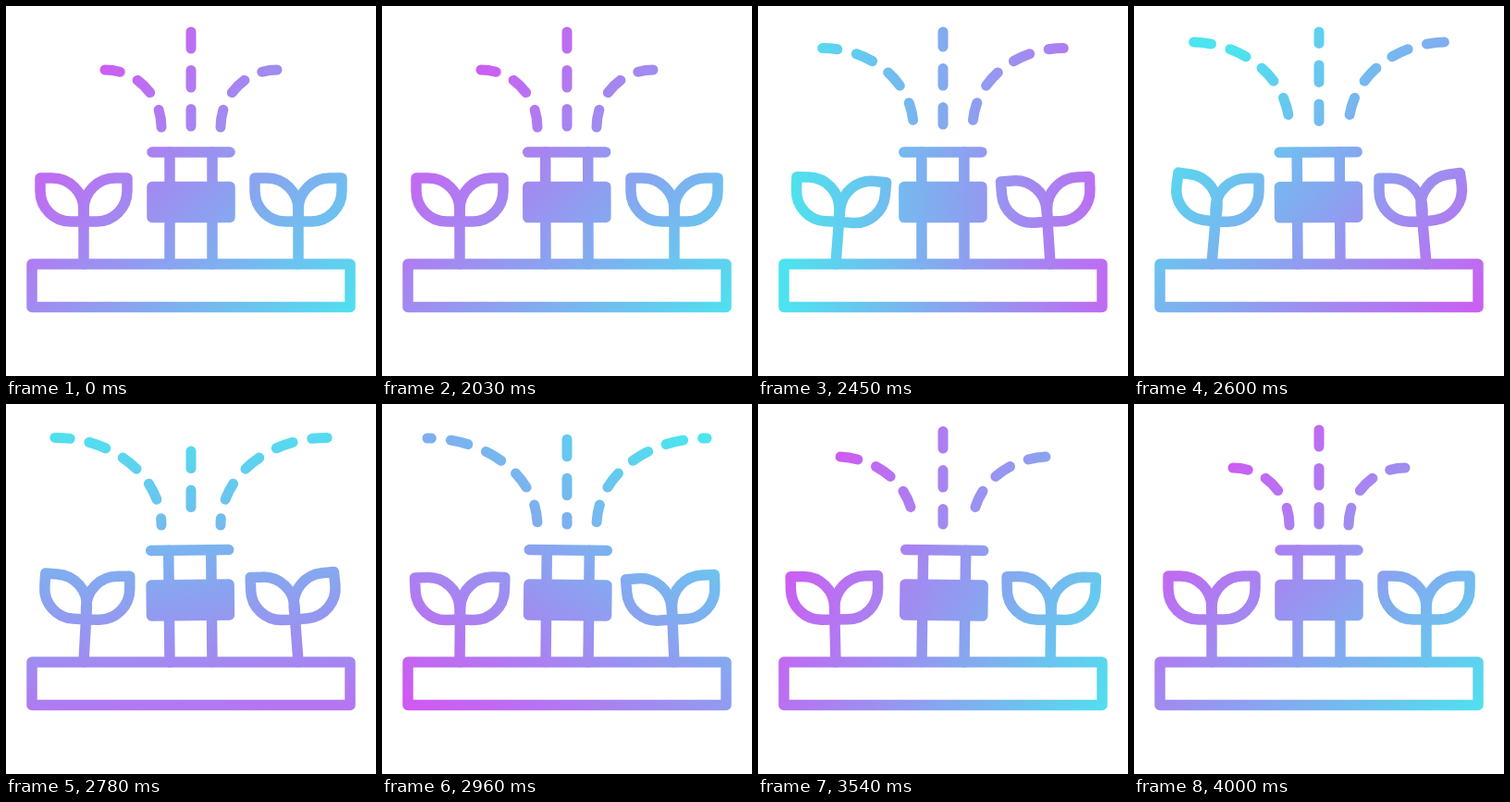
An HTML page with a canvas that plays this animation: 400 px wide and 400 px high, repeating every 4.06 s.

```html
<!DOCTYPE html>
<html lang="en">
<head>
<meta charset="utf-8">
<title>Garden sprinkler</title>
<style>
html, body { margin: 0; width: 100%; height: 100%; overflow: hidden; background: #fff; }
canvas { display: block; width: 400px; height: 400px; }
</style>
</head>
<body>
<canvas id="stage"></canvas>
<script>
const LOOP = 4060, START = 2030, MOVE = 1970, TAU = Math.PI * 2;
const canvas = document.getElementById('stage');
const ctx = canvas.getContext('2d');
const ratio = Math.max(1, window.devicePixelRatio || 1);
canvas.width = canvas.height = 400 * ratio;

const TIMES = [0, 240, 570, 930, 1180, MOVE];
const rad = deg => deg * Math.PI / 180;

// Smooth curve through one value per entry of TIMES, resting at both ends
function curve(t, values) {
  const last = TIMES.length - 1;
  let i = 0;
  while (i < last - 1 && t >= TIMES[i + 1]) i++;
  const slope = k => k === 0 || k === last ? 0
    : (values[k + 1] - values[k - 1]) / (TIMES[k + 1] - TIMES[k - 1]);
  const span = TIMES[i + 1] - TIMES[i];
  const u = (t - TIMES[i]) / span, v = 1 - u;
  return values[i] * (1 + 2 * u) * v * v + slope(i) * span * u * v * v
    + values[i + 1] * u * u * (3 - 2 * u) - slope(i + 1) * span * u * u * v;
}

function group(draw) {
  ctx.save();
  draw();
  ctx.restore();
}

function line(x1, y1, x2, y2) {
  ctx.beginPath();
  ctx.moveTo(x1, y1);
  ctx.lineTo(x2, y2);
  ctx.stroke();
}

function mirror() {
  ctx.translate(400, 0);
  ctx.scale(-1, 1);
}

// Leaf pointing up and left from its root at the origin
const leafShape = new Path2D('M0 0H-14A33 33 0 0 1 -47 -33V-47H-34A34 34 0 0 1 0 -13Z');

function leaf(angle, side) {
  group(() => {
    ctx.rotate(rad(angle));
    ctx.scale(side, 1);
    ctx.stroke(leafShape);
  });
}

function plant(t, lean, outer, inner) {
  const tilt = curve(t, lean);
  ctx.translate(84, 279);
  ctx.rotate(rad(tilt));
  line(0, 0, 0, -46);
  ctx.translate(0, -46);
  leaf(curve(t, outer) - tilt, 1);
  leaf(curve(t, inner) - tilt, -1);
}

function jet(t, flow) {
  const rx = 61 + curve(t, [0, 24, 46, 58, 47, 0]);
  const ry = 62 + curve(t, [0, 13, 30, 32, 25, 0]);
  ctx.setLineDash([19, 21]);
  ctx.lineDashOffset = -flow;
  ctx.beginPath();
  ctx.ellipse(168 - rx, 131, rx, ry, 0, 0, -Math.PI / 2, true);
  ctx.stroke();
}

function nozzle(t, moving) {
  const shake = moving ? -0.8 * Math.sin(TAU * (14 * t / MOVE + 0.03)) : 0;
  ctx.translate(200, 279);
  ctx.rotate(rad(shake));
  ctx.translate(-200, -279);
  line(158, 158, 242, 158);
  line(177, 158, 177, 279);
  line(223, 158, 223, 279);
  ctx.beginPath();
  ctx.rect(158, 195.5, 84, 33);
  ctx.fill();
  ctx.stroke();
}

function tint(p) {
  const angle = rad(225 + 360 * (1 - (1 - p) ** 2));
  const dx = 200 * Math.cos(angle), dy = 200 * Math.sin(angle);
  const paint = ctx.createLinearGradient(228 + dx, 212 + dy, 228 - dx, 212 - dy);
  paint.addColorStop(0, '#cf5af2');
  paint.addColorStop(1, '#4ce4ee');
  ctx.globalCompositeOperation = 'source-in';
  ctx.fillStyle = paint;
  ctx.fillRect(0, 0, 400, 400);
}

function render(now) {
  let t = now % LOOP - START;
  const moving = t >= 0 && t < MOVE;
  // Steps of 30 ms, with one longer step midway
  const shift = t >= 970 ? 10 : 0;
  t = moving ? Math.floor((t - shift) / 30) * 30 + shift : 0;
  const flow = 600 * t / MOVE;

  ctx.setTransform(ratio, 0, 0, ratio, 0, 0);
  ctx.clearRect(0, 0, 400, 400);
  ctx.lineWidth = 11.5;
  ctx.lineCap = ctx.lineJoin = 'round';

  group(() => {
    ctx.strokeRect(28, 279, 344, 46.5);
    group(() => nozzle(t, moving));
    group(() => plant(t, [0, 2.5, 5, 0.5, -2, 0], [0, -7, 8, -2.4, -1.8, 0], [0, 11, 0, 1.8, -0.6, 0]));
    group(() => {
      mirror();
      plant(t, [0, 1.5, 5, 2.5, -1, 0], [0, -5.5, 7.5, 2, -3, 0], [0, 9.6, 0, 4.3, 2, 0]);
    });
    ctx.lineWidth = 11;
    group(() => jet(t, flow));
    group(() => {
      mirror();
      jet(t, flow);
    });
    ctx.setLineDash([18.5, 23.5]);
    ctx.lineDashOffset = -flow;
    line(200, 130, 200, 28);
  });
  group(() => tint(t / MOVE));
}

function tick() {
  render(performance.now());
  requestAnimationFrame(tick);
}
tick();
</script>
</body>
</html>
```
